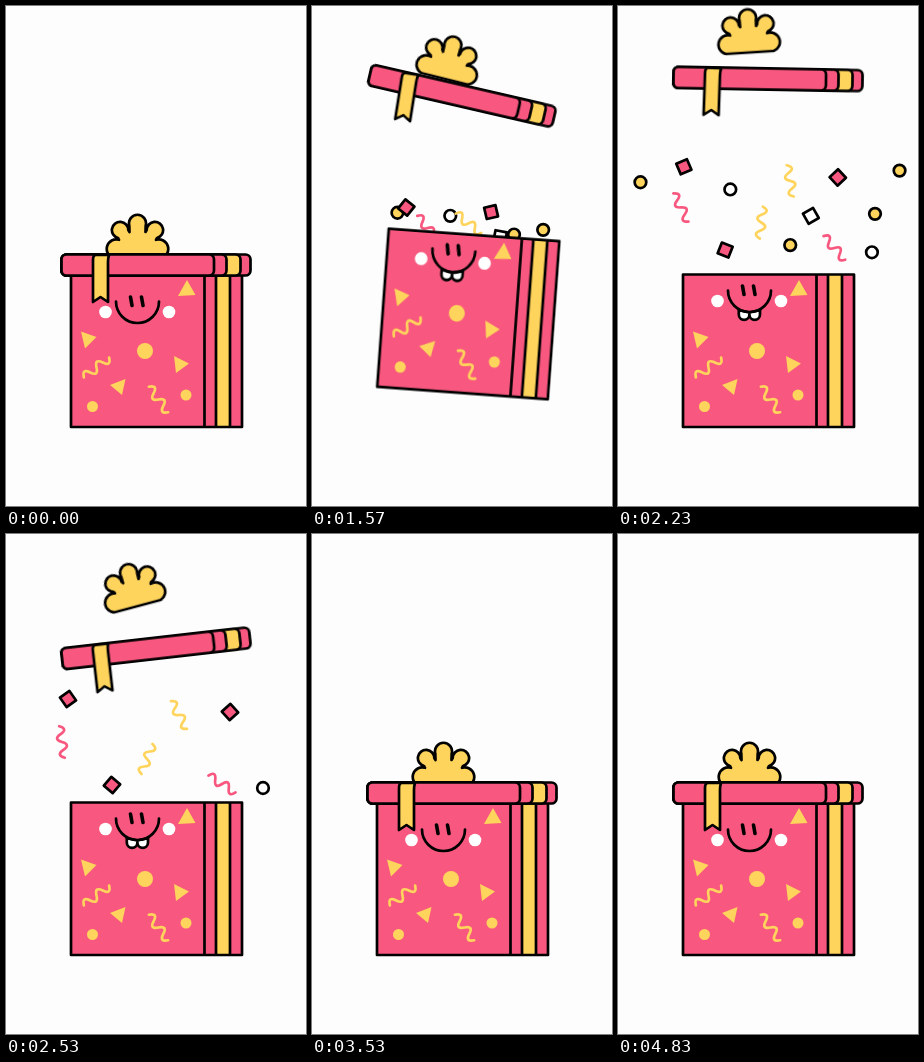
An HTML page that plays this animation: 300x500 px, repeating every 5010 ms.

```html
<!DOCTYPE html>
<html lang="en">
<head>
<meta charset="utf-8">
<title>Gift box</title>
<style>
html, body { margin: 0; width: 100%; height: 100%; overflow: hidden; background: #fdfdfd; }
svg { display: block; width: 100vw; height: 100vh; }

.ink { stroke: #000; stroke-width: 2.7; stroke-linejoin: round; stroke-linecap: round; }
.none { fill: none; }
.pink { fill: #f8587f; }
.yellow { fill: #ffd45c; }
.white { fill: #fff; }
.wave { fill: none; stroke-width: 2.7; stroke-linecap: round; }
.wave.pink { stroke: #f8587f; fill: none; }
.wave.yellow { stroke: #ffd45c; fill: none; }

#gift, #box, #lid, #bow, #ribbon, #face, #teeth, #eyes, #squint, .bit {
  animation: 5010ms ease-in-out infinite;
}
#gift { transform-origin: 150px 421px; animation-name: gift; }
#box { transform-origin: 150.5px 421px; animation-name: box; }
#lid { transform-origin: 150px 259px; animation-name: lid; }
#bow { transform-origin: 131.5px 248px; animation-name: bow; }
#ribbon { transform-origin: 95px 252px; animation-name: ribbon; }
#face { animation-name: face; }
#teeth { transform-origin: 131.5px 316px; animation-name: teeth; }
#eyes { animation-name: eyes; animation-timing-function: step-end; }
#squint { animation-name: squint; animation-timing-function: step-end; }
.bit { animation-name: fly, early; }
.bit.late { animation-name: fly, late; }

/* 1% is 50.1 ms */
@keyframes gift {
  0%, 2.6% { transform: scaleY(1); }
  8% { transform: scaleY(.86); }
  12.8% { transform: scaleY(1.175); }
  17.4% { transform: scaleY(.75); }
  24% { transform: scaleY(.72); }
  27.5% { transform: scaleY(1.04); }
  30%, 55.3% { transform: scaleY(1); }
  57.5% { transform: scaleY(.93); }
  61% { transform: scaleY(1.033); }
  64% { transform: scaleY(.995); }
  66.5%, 100% { transform: scaleY(1); }
}
@keyframes box {
  0%, 26.5% { transform: none; animation-timing-function: ease-out; }
  30% { transform: translateY(-36px) rotate(5deg) scaleY(1.05); animation-timing-function: linear; }
  31.3% { transform: translateY(-34px) rotate(4.2deg) scaleY(1.04); animation-timing-function: ease-in; }
  34.5% { transform: translateY(0) rotate(0deg) scaleY(.97); }
  38%, 100% { transform: none; }
}
@keyframes lid {
  0%, 25.5% { transform: translateY(0) rotate(0deg); animation-timing-function: cubic-bezier(.2, .6, .5, 1); }
  31.3% { transform: translateY(-169px) rotate(13deg); animation-timing-function: linear; }
  38.5% { transform: translateY(-177px) rotate(10deg); animation-timing-function: ease-out; }
  44.5% { transform: translateY(-186px) rotate(1deg); animation-timing-function: cubic-bezier(.4, 0, .75, .6); }
  50.5% { transform: translateY(-145px) rotate(-6.5deg); animation-timing-function: cubic-bezier(.4, .18, .8, .6); }
  55.3%, 100% { transform: translateY(0) rotate(0deg); }
}
@keyframes bow {
  0%, 25.5% { transform: translate(0, 0) rotate(0deg); animation-timing-function: cubic-bezier(.2, .6, .5, 1); }
  31.3% { transform: translate(2px, -179px) rotate(14deg); animation-timing-function: linear; }
  38.5% { transform: translate(1px, -191px) rotate(8deg); animation-timing-function: ease-out; }
  45.5% { transform: translate(0, -206px) rotate(-4deg); animation-timing-function: cubic-bezier(.4, 0, .75, .6); }
  50.5% { transform: translate(-1px, -180px) rotate(-15deg); animation-timing-function: cubic-bezier(.4, .18, .8, .6); }
  55.8%, 100% { transform: translate(0, 0) rotate(0deg); }
}
@keyframes ribbon {
  0%, 2.6% { transform: rotate(0deg); }
  8% { transform: rotate(4deg); }
  12.8% { transform: rotate(-3deg); }
  17.4% { transform: rotate(9deg); }
  23% { transform: rotate(0deg); }
  31.3% { transform: rotate(-4deg); }
  38.5% { transform: rotate(2deg); }
  50.5%, 55.3% { transform: rotate(0deg); }
  58.5% { transform: rotate(6deg); }
  62.5% { transform: rotate(-3deg); }
  66.5%, 100% { transform: rotate(0deg); }
}
@keyframes face {
  0%, 26% { transform: translateY(0); }
  30%, 53% { transform: translateY(-11px); }
  57%, 100% { transform: translateY(0); }
}
@keyframes teeth {
  0%, 13% { transform: scaleY(0); }
  15%, 60% { transform: scaleY(1); }
  62.5%, 100% { transform: scaleY(0); }
}
@keyframes eyes {
  0%, 25.5% { opacity: 1; }
  14% { opacity: 0; }
}
@keyframes squint {
  0%, 25.5% { opacity: 0; }
  14% { opacity: 1; }
}
@keyframes fly {
  0%, 27.5% { translate: 150px 350px; rotate: var(--r0); animation-timing-function: linear; }
  31.3% { translate: var(--p0); rotate: var(--r0); animation-timing-function: cubic-bezier(.15, .6, .5, 1); }
  38.5% { translate: var(--p1); rotate: var(--r1); animation-timing-function: cubic-bezier(.3, .4, .7, .9); }
  50.5%, 100% { translate: var(--p2); rotate: var(--r2); }
}
@keyframes early {
  0%, 27.4% { scale: 0; }
  27.5%, 47% { scale: 1; }
  49.8%, 100% { scale: 0; }
}
@keyframes late {
  0%, 27.4% { scale: 0; }
  27.5%, 51.5% { scale: 1; }
  54.8%, 100% { scale: 0; }
}
</style>
</head>
<body>
<svg viewBox="0 0 300 500">
  <defs>
    <path id="wave" d="M-16 0q4-8.500 8 0t8 0 8 0 8 0"/>
    <circle id="dot" r="5.800"/>
    <rect id="square" x="-5.800" y="-5.800" width="11.600" height="11.600"/>
  </defs>
  <g id="gift">
    <g id="confetti"></g>

    <g id="box">
      <rect class="pink" x="65" y="268.5" width="171" height="152.5"/>
      <rect class="yellow" x="210" y="268.5" width="14" height="152.5"/>
      <path class="ink none" d="M65 268.5H236V421H65ZM198.5 268.5V421M210 268.5V421M224 268.5V421"/>
      <g class="yellow">
        <path d="M75 325.500L90.500 331 79 342.500ZM181 274L189.500 289 172 290ZM168 350L183 357.500 170 367ZM104 379L119.500 373 116 389Z"/>
        <circle cx="139" cy="345" r="8"/>
        <circle cx="180" cy="389" r="5.500"/>
        <circle cx="86.500" cy="400.500" r="5.500"/>
      </g>
      <use class="wave yellow" href="#wave" transform="translate(90.5 361.5) rotate(-38)"/>
      <use class="wave yellow" href="#wave" transform="translate(152.5 393.5) rotate(53)"/>
      <g id="face">
        <circle class="white" cx="99.500" cy="306" r="6.300"/>
        <circle class="white" cx="163" cy="306" r="6.300"/>
        <path id="teeth" class="ink white" d="M120.800 315V319.500A5.300 5.300 0 0 0 131.400 319.500V317.500V319.500A5.300 5.300 0 0 0 142 319.500V315L131.400 317.500Z"/>
        <path class="ink none" d="M110 295.500A21.500 21.500 0 0 0 153 295.500"/>
        <path id="eyes" class="ink none" style="stroke-width:3.6" d="M124.500 291l1.500 8.500M135.500 291l1.500 8.500"/>
        <path id="squint" class="ink none" d="M121 291l9 5-9 5M145 291l-9 5 9 5"/>
      </g>
    </g>

    <path id="bow" class="ink yellow" d="M107.500 252A9.300 9.300 0 0 1 113 233.800L112 232A8.200 8.200 0 1 1 122.300 224L123.500 226 123.300 219.500A8.500 8.500 0 1 1 139.700 219.500L139.500 226 140.700 224A8.200 8.200 0 1 1 151 232L150 233.800A9.300 9.300 0 0 1 155.500 252Z"/>

    <g id="lid" class="ink">
      <rect class="pink" x="55.500" y="248.500" width="189" height="21" rx="5"/>
      <rect class="yellow" x="55.500" y="248.500" width="179" height="21" rx="5"/>
      <rect class="pink" x="55.500" y="248.500" width="165" height="21" rx="5"/>
      <rect class="pink" x="55.500" y="248.500" width="152.500" height="21" rx="5"/>
      <path id="ribbon" class="yellow" d="M90 249H103Q102 252 102 256V296L94.500 291 87 296V254Q87 249 90 249Z"/>
    </g>
  </g>
</svg>
<script>
// shape, colour, life, then x, y, turn at launch, at the top and while falling
const bits = [
  ["dot", "yellow", "early", 87, 208, 0, 36, 167, 0, 14, 182, 0],
  ["square", "pink", "late", 95, 203, 40, 72, 154, -4, 62, 165, -35],
  ["wave", "pink", "late", 117, 223, 50, 74, 191, 33, 56, 208, 80],
  ["dot", "white", "early", 139, 211, 0, 116, 173, 0, 110, 190, 0],
  ["wave", "yellow", "late", 156, 219, 35, 171, 165, 105, 173, 181, 60],
  ["wave", "yellow", "late", 148, 252, 40, 147, 203, 72, 141, 225, 110],
  ["square", "pink", "late", 178, 207.5, -15, 213, 161, 45, 224, 178, 48],
  ["square", "white", "early", 188, 232, 10, 191, 200, 45, 194, 216, 70],
  ["dot", "yellow", "early", 200.5, 229.5, 0, 249, 198, 0, 262, 214, 0],
  ["dot", "yellow", "early", 230, 226, 0, 268, 156, 0, 290, 170, 0],
  ["dot", "yellow", "early", 165, 262, 0, 171, 228, 0, 173, 246, 0],
  ["square", "pink", "late", 118, 262, 20, 109, 233, -8, 106, 251, 40],
  ["dot", "white", "late", 215, 262, 0, 249, 234, 0, 257, 254, 0],
  ["wave", "pink", "late", 190, 264, 40, 217, 229, 72, 216, 250, 32]
];

const confetti = document.getElementById("confetti");
for (const [shape, colour, life, ...path] of bits) {
  const bit = document.createElementNS("http://www.w3.org/2000/svg", "use");
  bit.setAttribute("href", "#" + shape);
  bit.setAttribute("class", `bit ${life} ${colour} ${shape === "wave" ? "wave" : "ink"}`);
  for (let i = 0; i < 3; i++) {
    const [x, y, turn] = path.slice(i * 3);
    bit.style.setProperty("--p" + i, `${x}px ${y}px`);
    bit.style.setProperty("--r" + i, turn + "deg");
  }
  confetti.append(bit);
}
</script>
</body>
</html>
```
